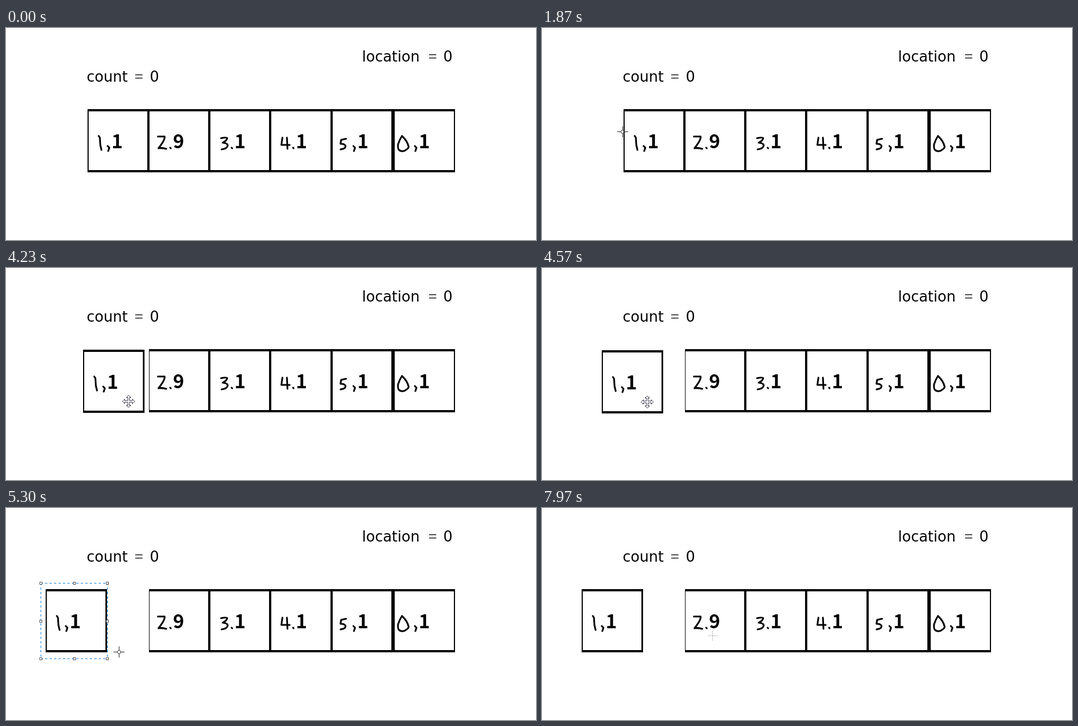
These frames come from a looping animation (949x379 px, 8000 ms). An HTML page with a canvas:

```html
<!DOCTYPE html>
<html lang="en">
<head>
<meta charset="utf-8">
<title>Array sort, first bucket</title>
<style>
  html, body { margin: 0; width: 100%; height: 100%; overflow: hidden; background: #fff; }
  canvas { display: block; }
</style>
</head>
<body>
<canvas id="stage" width="949" height="379"></canvas>
<script>
const ctx = document.getElementById('stage').getContext('2d');
const LOOP = 8000;
const LABEL = '26px "DejaVu Sans", sans-serif';
const SIGN = '28px "Liberation Serif", serif';
const DIGIT = 'bold 34px "Noto Sans CJK KR", "Noto Sans CJK JP", "Noto Sans CJK", sans-serif';

const linear = u => u;
const easeOut = u => 1 - (1 - u) ** 4;

// Each gesture follows a Bezier curve through its control points.
const gesture = (from, to, ease, ...points) => ({ from, to, ease, points });
const drag = gesture(4150, 4950, linear, [227, 237], [190, 241], [152, 237]);
const gestures = [
  gesture(960, 1770, linear, [292, -14], [169, 174]),
  gesture(1770, 2600, easeOut, [169, 174], [129, 211], [137, 134]),
  gesture(2630, 3430, easeOut, [137, 134], [256, 269]),
  gesture(3830, 4150, linear, [256, 269], [227, 237]),
  drag,
  gesture(5050, 5470, linear, [152, 237], [182, 247], [251, 279]),
  gesture(5530, 5670, linear, [251, 279], [284, -14]),
  gesture(6120, 6930, linear, [262, -6], [63, 292], [135, 240]),
  gesture(6970, 7770, linear, [135, 240], [190, 368], [420, 250], [292, 190]),
  gesture(7800, 7970, linear, [292, 190], [305, 228])
];

const COMMA = 'M182 211l3 3-2 6';
const DOT = 'M184 214l1 1';
const STEP = 110;
const cells = [
  { ink: 'M166 193l2 3 1 14 2 8' + COMMA, digit: '1' },
  { ink: 'M162 194h12q1 6-11 21 6-1 14 1' + DOT, digit: '9' },
  { ink: 'M165 197q10-2 11 0 0 4-8 8 9 1 9 5-1 6-11 7' + DOT, digit: '1' },
  { ink: 'M165 196l-2 13h15M173 196l1 20' + DOT, digit: '1' },
  { ink: 'M169 198l-9 2-1 7q8 0 9 4 0 5-9 6' + COMMA, digit: '1' },
  { ink: 'M159 193q-5 8-7 15-1 9 3 11 6 3 11-1 5-3 5-6-3-11-12-19' + COMMA, digit: '1' }
].map(c => ({ ink: new Path2D(c.ink), digit: c.digit }));

function bezier(points, u) {
  if (points.length === 1) return points[0];
  return bezier(points.slice(1).map(([x, y], i) => [
    points[i][0] + (x - points[i][0]) * u,
    points[i][1] + (y - points[i][1]) * u
  ]), u);
}

function pointer(t) {
  const g = gestures.filter(g => g.from <= t).pop() || gestures[0];
  const u = Math.min(Math.max((t - g.from) / (g.to - g.from), 0), 1);
  return bezier(g.points, g.ease(u)).map(Math.round);
}

function bar(x1, y1, x2, y2) {
  ctx.fillRect(x1, y1, x2 - x1, y2 - y1);
}

function label(name, x, signX, valueX, y) {
  ctx.font = LABEL;
  ctx.fillText(name, x, y);
  ctx.fillText('0', valueX, y);
  ctx.font = SIGN;
  ctx.fillText('=', signX, y);
}

function drawCell(i) {
  ctx.save();
  ctx.translate(i * STEP, 0);
  ctx.lineWidth = 3.1;
  ctx.lineCap = ctx.lineJoin = 'round';
  ctx.strokeStyle = '#000';
  ctx.stroke(cells[i].ink);
  ctx.font = DIGIT;
  ctx.fillText(cells[i].digit, 189, 215);
  ctx.restore();
}

function rails(x1, x2) {
  bar(x1, 145, x2, 149);
  bar(x1, 254, x2, 258);
}

function post(x, width) {
  bar(x, 145, x + width, 258);
}

function drawRest() {
  rails(256, 804);
  post(256, 1);
  post(802, 2);
  for (let i = 1; i < 5; i++) post(Math.floor(253.3 + 109.3 * i), i < 4 ? 4 : 6);
  for (let i = 1; i < cells.length; i++) drawCell(i);
}

function drawFirst(dx, dy) {
  ctx.save();
  ctx.translate(dx, dy);
  rails(146, 256);
  post(146, 2);
  post(253, 3);
  drawCell(0);
  ctx.restore();
}

function dashedBox(x1, y1, x2, y2, color, dash) {
  ctx.save();
  ctx.lineWidth = 1;
  ctx.lineCap = 'butt';
  ctx.strokeStyle = color;
  ctx.setLineDash([dash, dash]);
  ctx.beginPath();
  for (const y of [y1, y2]) { ctx.moveTo(x1, y + .5); ctx.lineTo(x2 + 1, y + .5); }
  for (const x of [x1, x2]) { ctx.moveTo(x + .5, y1); ctx.lineTo(x + .5, y2 + 1); }
  ctx.stroke();
  ctx.restore();
}

function drawSelected(dx) {
  const xs = [137 + dx, 197 + dx, 256 + dx], ys = [134, 202, 269];
  dashedBox(xs[0], ys[0], xs[2], ys[2], '#0078d7', 4);
  ctx.lineWidth = 1;
  ctx.lineJoin = 'miter';
  ctx.strokeStyle = '#555';
  xs.forEach((x, i) => ys.forEach((y, j) => {
    if (i === 1 && j === 1) return;
    ctx.clearRect(x - 2, y - 2, 5, 5);
    ctx.strokeRect(x - 1.5, y - 1.5, 4, 4);
  }));
}

function crosshair(dotted) {
  const gap = dotted ? 1 : 3;
  ctx.lineWidth = 1;
  ctx.lineCap = 'butt';
  ctx.strokeStyle = dotted ? '#666' : '#222';
  ctx.setLineDash(dotted ? [1, 2] : []);
  ctx.beginPath();
  for (const s of [-1, 1]) {
    ctx.moveTo(s * gap, 0); ctx.lineTo(s * 10, 0);
    ctx.moveTo(0, s * gap); ctx.lineTo(0, s * 10);
  }
  if (!dotted) { ctx.moveTo(3, 0); ctx.arc(0, 0, 3, 0, 7); }
  ctx.stroke();
}

function moveArrows() {
  const arm = [[-1.5, -1.5], [-1.5, -7], [-4, -7], [0, -11], [4, -7], [1.5, -7]];
  ctx.beginPath();
  for (let q = 0; q < 4; q++) {
    const c = Math.cos(q * Math.PI / 2), s = Math.sin(q * Math.PI / 2);
    for (const [x, y] of arm) ctx.lineTo(x * c - y * s, x * s + y * c);
  }
  ctx.closePath();
  ctx.lineWidth = 1;
  ctx.lineJoin = 'miter';
  ctx.fillStyle = '#fff';
  ctx.strokeStyle = '#334';
  ctx.fill();
  ctx.stroke();
}

function drawPointer(t, x, y) {
  ctx.save();
  ctx.translate(x + .5, y + .5);
  if (t > 3940 && t < 5180) moveArrows();
  else crosshair(t > 6100);
  ctx.restore();
}

function draw(t) {
  const [x, y] = pointer(t);
  const held = t >= drag.from && t < drag.to;
  const [gx, gy] = drag.points[0];
  const [px, py] = pointer(Math.min(Math.max(t, drag.from), drag.to));
  const dx = px - gx, dy = py - gy;

  ctx.clearRect(0, 0, 949, 379);
  ctx.fillStyle = '#000';
  label('count', 144.5, 230, 257.5, 96);
  label('location', 637.5, 756, 783, 60);
  drawRest();
  drawFirst(dx, dy);

  if (t >= 2630 && t < 3830) dashedBox(137, 134, x, y - 1, '#000', 3);
  else if (t >= 3830 && t < 5400 && !held) drawSelected(dx);

  drawPointer(t, x, y);
}

const start = performance.now();
function tick() {
  draw((performance.now() - start) % LOOP);
  requestAnimationFrame(tick);
}
tick();
</script>
</body>
</html>
```
